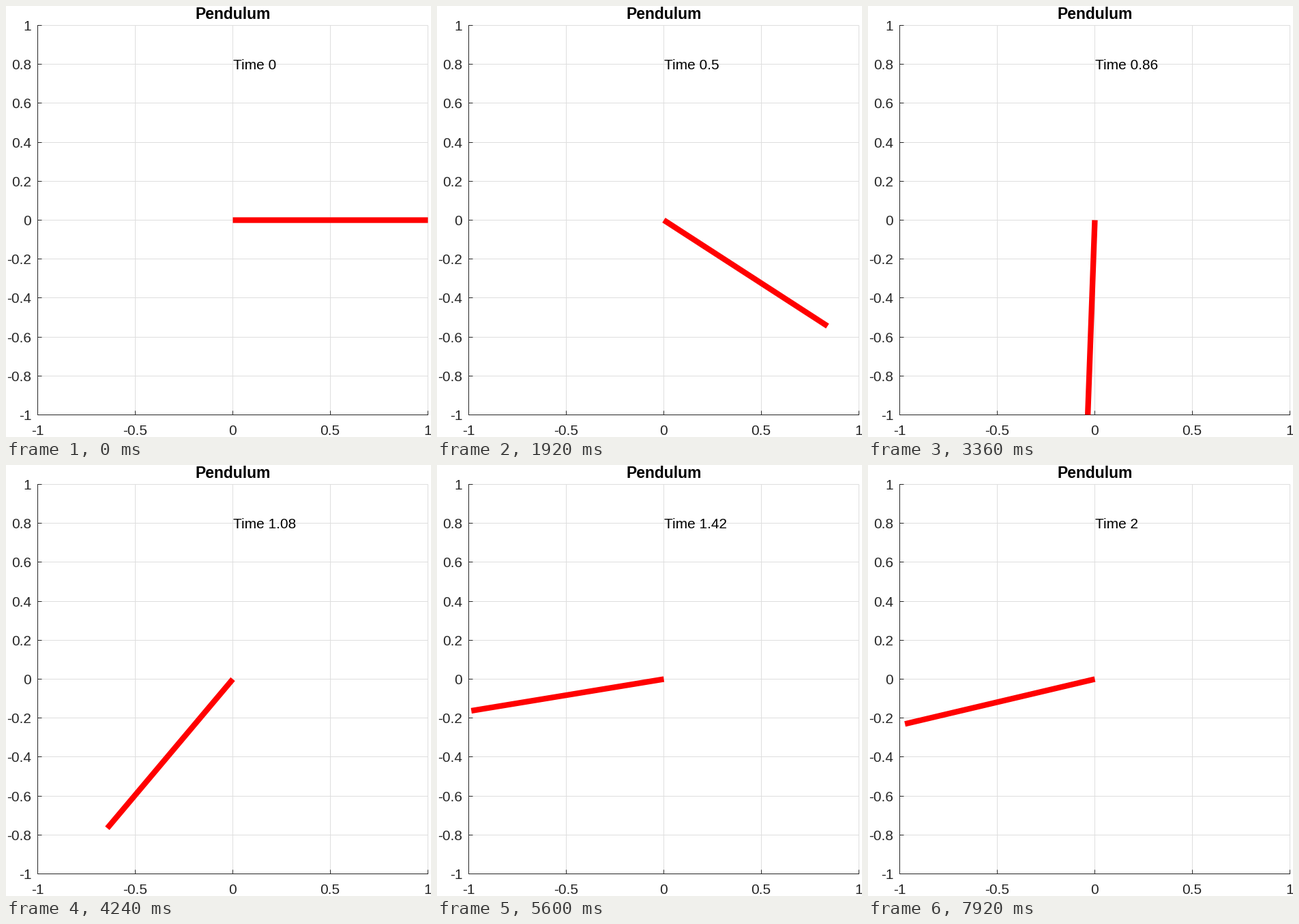
These frames come from a looping animation (623 by 633 pixels, 8000 ms). A matplotlib script:

```python
import numpy as np
import matplotlib.pyplot as plt
from matplotlib.animation import FuncAnimation

W, H, DPI = 623, 633, 100
PX = 72 / DPI                      # one pixel in points
LEFT, RIGHT, TOP, BOTTOM = 46.5, 618.5, 28.5, 600.5
PIVOT = np.array([332.5, 314.5])
LENGTH = 286
FRAMES, INTERVAL = 100, 80

plt.rcParams["font.family"] = "Liberation Sans"
INK, GRID = "#262626", "#dedede"

fig = plt.figure(figsize=(W / DPI, H / DPI), dpi=DPI, facecolor="white")
ax = fig.add_axes([0, 0, 1, 1])
ax.set_xlim(0, W)
ax.set_ylim(H, 0)
ax.axis("off")


def line(x, y, color, width=1, **kw):
    return ax.plot(x, y, color=color, lw=width * PX, snap=False,
                   solid_capstyle="butt", **kw)[0]


def label(x, y, text, size=20.83, color=INK, **kw):
    return ax.text(x, y, text, fontsize=size * PX, color=color,
                   va="baseline", **kw)


def pixel_center(v):
    return np.floor(v) + 0.5


def swing(g=4.935, dt=0.002, end=2.0):
    """Angle below the horizontal, released from rest, by Euler steps."""
    times = np.arange(0, end + dt, dt)
    angles, angle, speed = [], 0.0, 0.0
    for _ in times:
        angles.append(angle)
        angle, speed = angle + dt * speed, speed + dt * g * np.cos(angle)
    return times, np.array(angles)


x_ticks = [(pixel_center(PIVOT[0] + v * LENGTH), v)
           for v in np.linspace(-1, 1, 5)]
y_ticks = [(pixel_center(PIVOT[1] - v * LENGTH), v)
           for v in np.round(np.linspace(-1, 1, 11), 1) + 0.0]

for x, _ in x_ticks:
    line([x, x], [TOP, BOTTOM], GRID, zorder=1)
for y, _ in y_ticks:
    line([LEFT, RIGHT], [y, y], GRID, zorder=1)

line([LEFT, LEFT], [TOP - 0.5, BOTTOM + 0.5], INK, zorder=2)
line([LEFT - 0.5, RIGHT + 0.5], [BOTTOM, BOTTOM], INK, zorder=2)
for x, v in x_ticks:
    line([x, x], [BOTTOM - 6, BOTTOM], INK, zorder=2)
    label(x - 0.5, 630.5, f"{v:g}", ha="center")
for y, v in y_ticks:
    line([LEFT, LEFT + 6], [y, y], INK, zorder=2)
    label(37.3, y + 7.5, f"{v:g}", ha="right")

label(333, 19, "Pendulum", size=22.92, color="black", weight="bold",
      ha="center")
clock = label(333, 93, "Time 0", color="black", ha="left", zorder=4)
rod = line([], [], "red", width=8.33, zorder=3)
rod.set_clip_path(plt.Rectangle((LEFT - 0.5, TOP - 0.5), RIGHT - LEFT + 1,
                                BOTTOM - TOP + 1, transform=ax.transData))

TIMES, ANGLES = swing()
LAG = 0.0135                       # the pose trails the clock slightly


def draw(i):
    t = 0.02 * (i + 1) if i else 0.0
    angle = np.interp(t - LAG, TIMES, ANGLES)
    tip = PIVOT + LENGTH * np.array([np.cos(angle), np.sin(angle)])
    rod.set_data([PIVOT[0], tip[0]], [PIVOT[1], tip[1]])
    clock.set_text(f"Time {round(t, 2):g}")
    return rod, clock


anim = FuncAnimation(fig, draw, frames=FRAMES, interval=INTERVAL,
                     repeat=True, repeat_delay=0)
plt.show()
```
